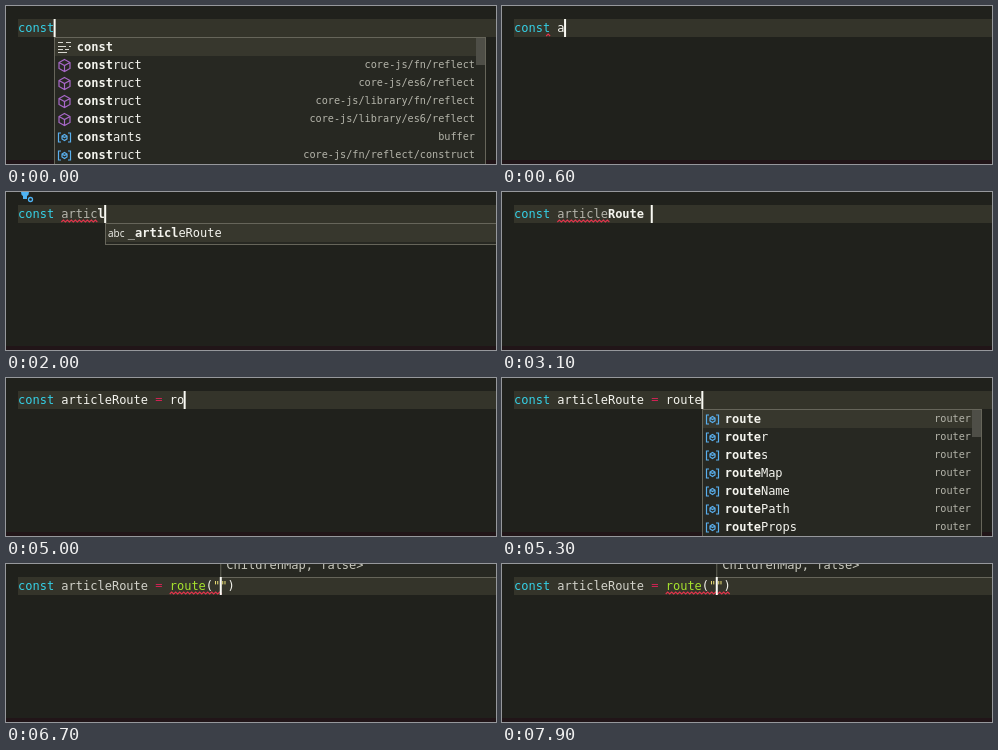
Animation, 490 px wide and 158 px high, one loop 8 s. Source, as an HTML page:

```html
<!DOCTYPE html>
<html lang="en">
<head>
<meta charset="utf-8">
<title>Typing with completion</title>
<style>
  html, body { margin: 0; width: 100%; height: 100%; overflow: hidden; background: #20211c; }
  svg { display: block; }
  text { font: 12px "DejaVu Sans Mono", monospace; white-space: pre; fill: #f4f4ee; }
  .bold { font-weight: bold; }
  .detail { font-size: 10.2px; fill: #b4b4aa; }
  .abc { font: 10px "Open Sans", sans-serif; }
</style>
</head>
<body>
<svg id="stage" width="490" height="158" viewBox="0 0 490 158"></svg>
<script>
const LOOP = 8000, CHAR = 7.224, LEFT = 12;
const WHITE = '#f4f4ee', GREY = '#b5b5ac', GREEN = '#a6e22e', RED = '#f0205c';
const stage = document.getElementById('stage');

// Completion rows: icon, label with *matched* parts, detail
const constRows = [
  ['word', '*const*', ''],
  ['cube', '*const*ruct', 'core-js/fn/reflect'],
  ['cube', '*const*ruct', 'core-js/es6/reflect'],
  ['cube', '*const*ruct', 'core-js/library/fn/reflect'],
  ['cube', '*const*ruct', 'core-js/library/es6/reflect'],
  ['value', '*const*ants', 'buffer'],
  ['value', '*const*ruct', 'core-js/fn/reflect/construct']
];
const asyncRow = ['snippet', '*a*sync arrow func*ti*on', 'Async Function Expression'];
const asyncRows = [asyncRow, ['snippet', '*a*sync function', 'Async Function Statement']];
const nameRow = match => [['abc', `_*${match}*` + 'articleRoute'.slice(match.length), '']];
const routeRows = match => ['route', 'router', 'routes', 'routeMap', 'routeName', 'routePath', 'routeProps']
  .map(word => ['value', `*${match}*` + word.slice(match.length), 'router']);

const typeName = name => ({ text: 'const ' + name, popup: nameRow(name) });
const typeValue = value => ({ text: 'const articleRoute = ' + value });

// Each entry changes part of the editor state; wave is [first column, end column]
const script = [
  [0, { text: 'const', popup: constRows, dim: 0, name: WHITE, call: WHITE }],
  [100, { text: 'const ', popup: null }],
  [200, { wave: [4.45, 5.25] }],
  [600, { text: 'const a' }],
  [700, { popup: asyncRows }],
  [900, { text: 'const ar' }],
  [1000, { text: 'const art' }],
  [1100, { text: 'const arti', popup: [asyncRow] }],
  [1200, { popup: null }],
  [1500, { text: 'const artic' }],
  [1700, { dim: 5, wave: [6, 11] }],
  [1900, { ...typeName('articl'), bulb: true }],
  [2100, typeName('article')],
  [2300, { dim: 7, wave: [6, 13], bulb: false }],
  [2400, typeName('articleR')],
  [2500, typeName('articleRo')],
  [2600, typeName('articleRou')],
  [2700, typeName('articleRout')],
  [2800, typeName('articleRoute')],
  [3100, { text: 'const articleRoute ', popup: null }],
  [3600, { dim: 12, wave: [6, 18] }],
  [3900, { text: 'const articleRoute =' }],
  [4000, { wave: null }],
  [4200, typeValue('')],
  [4600, { dim: 0 }],
  [4900, typeValue('r')],
  [5000, typeValue('ro')],
  [5100, { ...typeValue('rou'), popup: routeRows('rou') }],
  [5200, { ...typeValue('rout'), popup: routeRows('rout') }],
  [5300, { ...typeValue('route'), popup: routeRows('route') }],
  [5400, { name: GREEN, call: GREEN }],
  [5600, { ...typeValue('route()'), back: 1, popup: null }],
  [5900, { hint: true }],
  [6200, { name: '#d2d2ca', wave: [21, 28] }],
  [6600, { ...typeValue('route("")'), back: 2 }],
  [7000, { wave: [21, 30] }],
  [7400, { blinkOff: true }],
  [7900, { blinkOff: false }]
];

const columnX = column => LEFT + column * CHAR;
const rect = (x, y, w, h, fill, extra = '') =>
  `<rect x="${x}" y="${y}" width="${w}" height="${h}" fill="${fill}" ${extra}/>`;
const path = (d, stroke, extra = '') => `<path d="${d}" fill="none" stroke="${stroke}" ${extra}/>`;
const label = (x, y, content, extra = '') => `<text x="${x}" y="${y}" ${extra}>${content}</text>`;
const code = (column, content, color, extra = '') =>
  content ? label(columnX(column), 26, content, `style="fill:${color}" ${extra}`) : '';

const icons = {
  word: path('M1 1.5h5m3 0h5M1 5.5h8m3 0h2M1 8.5h5m2 0h4M1 11.5h9', '#d8d8d0'),
  cube: path('M7.500 .5l5.500 3v6l-5.500 3-5.500-3v-6zM2 3.500l5.500 3 5.500-3M7.500 6.500v6', '#a868c8', 'stroke-width="1.2"'),
  value: path('M4 2H1.500v9H4M11 2h2.500v9H11M5 5l2.500-1.500L10 5v3L7.500 9.500 5 8zM5 5l2.500 1.500L10 5', '#5ab0ee', 'stroke-width="1.2"'),
  snippet: path('M2.500 .5h11v12h-11z', '#e4e4dc', 'stroke-dasharray="2 .7"'),
  abc: label(0, 10, 'abc', 'class="abc"')
};

function drawPopup(rows, x) {
  const scrolls = rows.length > 2, right = scrolls ? 480 : 491;
  const height = rows.length * 18 + 3;
  let out = rect(x + .5, 31.5, right - x - 1, height, '#272822', 'stroke="#66655a"') +
    rect(x + 1, 32, right - x - 2, 18, '#37372d');
  if (scrolls) out += rect(470, 32, 9, 27, '#4e4e47');
  rows.forEach(([icon, name, detail], i) => {
    const y = 45 + i * 18;
    const parts = name.split('*').map((part, k) => k % 2 ? `<tspan class="bold">${part}</tspan>` : part);
    out += `<g transform="translate(${x + 3} ${y - 10})">${icons[icon]}</g>` +
      label(x + 22.800, y, parts.join('')) +
      (scrolls ? label(469, y - 1, detail, 'class="detail" text-anchor="end"')
               : label(351, y - 1, detail, 'class="detail"'));
  });
  return out;
}

function drawCode({ text, dim, name, call }) {
  const equals = text[19] === '='
    ? `<text class="bold" transform="translate(${columnX(19)} 24.2) scale(1 .6)" style="fill:${RED}">=</text>` : '';
  const open = text.indexOf('(');
  const strings = text.slice(27).replace(')', '');
  return code(0, text.slice(0, 5), '#35d0e6', 'font-style="italic"') +
    code(6, text.slice(6, 6 + dim), GREY) +
    code(6 + dim, text.slice(6 + dim, 18), name, dim ? 'class="bold"' : '') +
    equals + code(21, text.slice(21, 26), call) +
    (open < 0 ? '' : code(26, '(', WHITE) + code(27, strings, '#e6db74') + code(text.length - 1, ')', WHITE));
}

function drawWave([from, to]) {
  const x = columnX(from), steps = Math.round((to - from) * CHAR / 4);
  return path(`M${x} 30` + 'l2 -2l2 2'.repeat(steps), '#e3344c', 'stroke-width="1.1"');
}

function draw(state) {
  const { text, back = 0 } = state;
  const caret = columnX(text.length - back);
  let out = rect(0, 0, 490, 158, '#20211c') + rect(0, 154, 490, 4, '#211518') +
    rect(LEFT, 13, 478, 18, '#34342a');
  if (back === 1)
    for (const column of [26, 27])
      out += rect(columnX(column) + .5, 13.5, 6.5, 17, '#3c3d34', 'stroke="#85857b"');
  if (state.wave) out += drawWave(state.wave);
  out += drawCode(state);
  if (state.bulb)
    out += '<path d="M15 0h8q0 3-2 4v3h-4V4q-2-1-2-4z" fill="#4fb2f2"/>' +
      '<circle cx="24.500" cy="7.500" r="2" fill="none" stroke="#4fb2f2" stroke-width="1.300"/>';
  if (state.hint)
    out += rect(caret + .5, -2, 300, 15.5, '#272822', 'stroke="#66655a"') +
      label(caret + 6, 5, 'ChildrenMap, false&gt;', 'style="fill:#c8c8be"');
  if (state.popup) out += drawPopup(state.popup, Math.round(caret));
  if (!state.blinkOff) out += rect(caret - .5, 13, 2, 18, '#fafaf4');
  stage.innerHTML = out;
}

let shown = 0;
function tick(now) {
  const past = script.filter(([time]) => time <= now % LOOP);
  if (past.length !== shown) {
    shown = past.length;
    draw(Object.assign({}, ...past.map(([, change]) => change)));
  }
  requestAnimationFrame(tick);
}
tick(performance.now());
</script>
</body>
</html>
```
